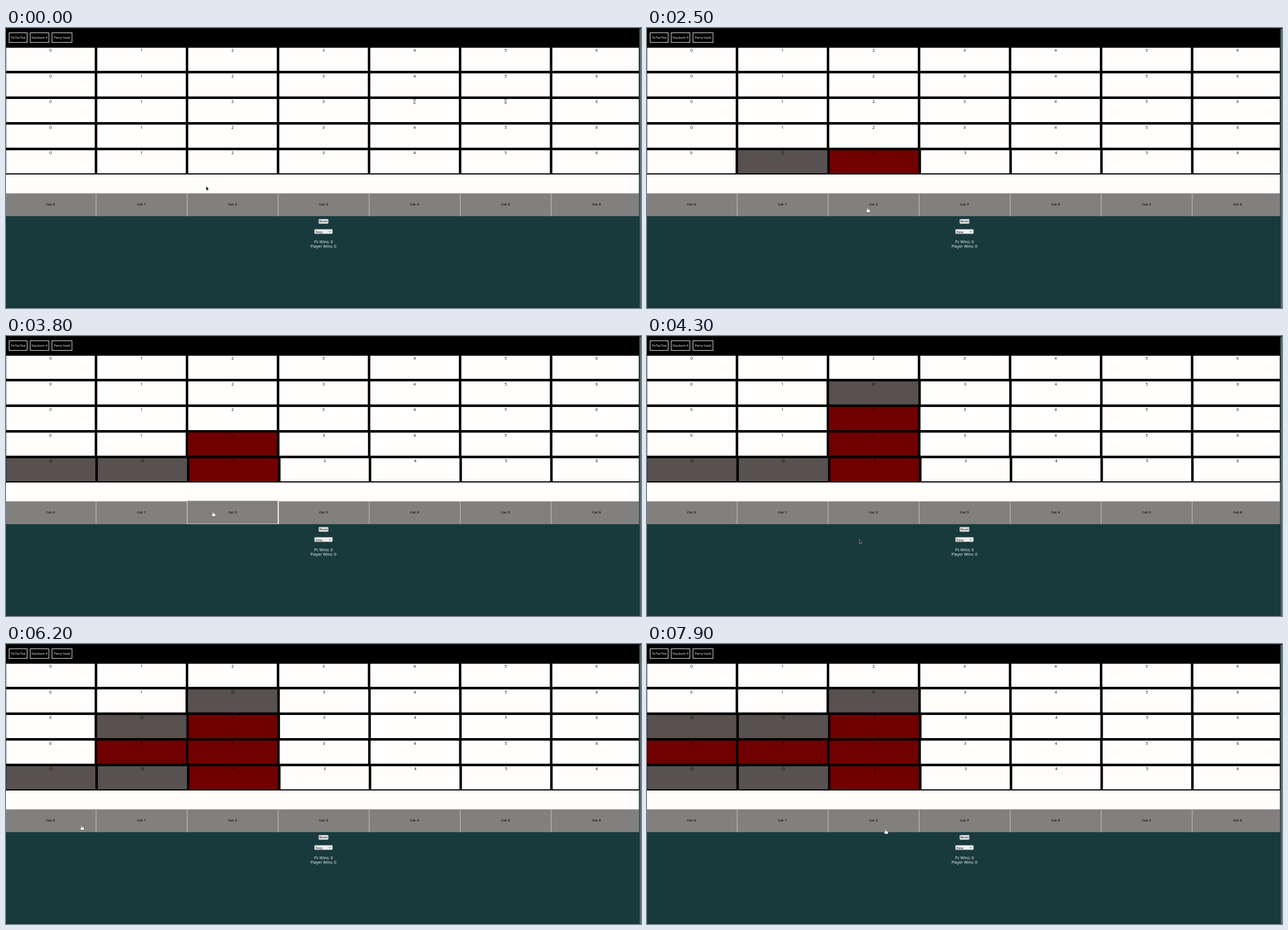
Write an HTML page with a canvas that moves like this. It is 1126 by 497 pixels and loops after 8000 ms.

```html
<!DOCTYPE html>
<html lang="en">
<head>
<meta charset="utf-8">
<title>Drop game</title>
<style>
  html, body { margin: 0; width: 100%; height: 100%; overflow: hidden; background: #183a3d; }
  canvas { display: block; }
</style>
</head>
<body>
<canvas id="stage" width="1126" height="497"></canvas>
<script>
const ctx = document.getElementById('stage').getContext('2d');
const LOOP = 8000, TICK = 100, COLS = 7, ROWS = 5;
const PITCH = 161.4, CELL = 157, RIGHT = 1122.5;
const WHITE = '#fffefd', GREY = '#82807e', TEAL = '#183a3d';
const FILL = { X: '#700000', O: '#575150' };
const EXTRA = { X: 0.6, O: 1.6 }; // a letter is wider than a digit and pushes its row

// time, player column, computer column, how long the button was held
const TURNS = [[1500, 2, 1, 100], [2700, 2, 0, 0], [3900, 2, 2, 100], [5500, 1, 1, 500], [6300, 0, 0, 0]];

// first and last step, end point, optional control point of the curve
const STROKES = [
  [100, 300, 375, 244],
  [1100, 1400, 383, 308],
  [1900, 1900, 410, 320],
  [2100, 2500, 391, 319, 455, 362],
  [2900, 3600, 367, 312, 345, 388],
  [4100, 4300, 376.5, 361],
  [4600, 4800, 287, 307],
  [5400, 5500, 288, 336.5],
  [5700, 5800, 180, 337],
  [6000, 6200, 134, 322],
  [6600, 6600, 150, 327],
  [6800, 7600, 423, 329, 286, 372],
];

function rect(x, y, w, h, color) {
  ctx.fillStyle = color;
  ctx.fillRect(x, y, w, h);
}

function frame(x, y, w, h, color) {
  ctx.strokeStyle = color;
  ctx.lineWidth = 1;
  ctx.strokeRect(x, y, w, h);
}

function text(str, x, baseline, size, color, align = 'center', weight = 400) {
  ctx.font = `${weight} ${size}px "Open Sans", "Noto Sans", sans-serif`;
  ctx.textAlign = align;
  ctx.fillStyle = color;
  ctx.fillText(str, x, baseline);
}

function drawNav() {
  rect(0, 0, 1126, 260, '#000');
  rect(0, 0, 1126, 1, '#1c1c1c');
  let x = 5.5;
  for (const [label, w] of [['TicTacToe', 32], ['Stackum 4', 33], ['Perry Vask', 35.5]]) {
    frame(x, 8.5, w, 17, '#e8e8e8');
    text(label, x + w / 2, 19, 5.87, '#fff');
    x += w + 5.5;
  }
}

// Each mark falls onto the pile in its column.
function boardAt(t) {
  const board = Array.from({ length: ROWS }, () => []);
  const height = Array(COLS).fill(0);
  const drop = (col, mark) => { board[ROWS - ++height[col]][col] = mark; };
  for (const [time, player, computer] of TURNS) {
    if (t < time) break;
    drop(player, 'X');
    drop(computer, 'O');
  }
  return board;
}

function drawRow(marks, row, t) {
  const extra = c => EXTRA[marks[c]] || 0;
  const total = marks.reduce((sum, mark) => sum + EXTRA[mark], 0);
  const y = 35 + 45.5 * row;
  let x = 0.4;
  for (let c = 0; c < COLS; c++) {
    const w = CELL + extra(c) - total / COLS, mid = x + w / 2;
    rect(x, y, Math.min(w, 1122 - x), 41, FILL[marks[c]] || WHITE);
    const selected = t < 700 && row === 2 && (c === 4 || c === 5);
    if (selected) rect(mid - 2, y, 4, 9, '#a5a5a5');
    text(marks[c] || c, mid, y + 7, 7.04, selected ? '#eee' : '#000');
    x += w + PITCH - CELL;
  }
}

function drawButtons(t) {
  rect(0, 260, RIGHT, 74, WHITE);
  rect(0, 293.5, RIGHT, 40.5, GREY);
  const turn = TURNS.find(([time, , , hold]) => t >= time - hold && t < time);
  for (let c = 0; c < COLS; c++) {
    const x = PITCH * c;
    rect(x + 159.3, 293.5, 1, 40.5, '#cac8c6');
    if (turn && turn[1] === c) {
      rect(x - 1, 292, 161, 42, GREY);
      frame(x - 1.5, 292.5, 161, 41, '#c9c7c5');
      rect(x + 159, 292, 2, 42, '#f2f0ee');
    }
    text('Col: ' + c, x + 78.8, 315.4, 5.87, '#000', 'center', 600);
  }
}

function drawControl(x, y, w) {
  ctx.beginPath();
  ctx.roundRect(x, y, w, 8, 1.3);
  ctx.fillStyle = '#efefef';
  ctx.fill();
  ctx.lineWidth = 0.6;
  ctx.strokeStyle = '#8c9293';
  ctx.stroke();
}

function drawPanel() {
  rect(0, 334, 1126, 163, TEAL);
  drawControl(554.5, 339.2, 17);
  drawControl(547, 357.2, 32);
  text('Reset', 563, 345.4, 5.87, '#000');
  text('Easy', 549, 363.5, 5.87, '#000', 'left');
  ctx.lineWidth = 0.8;
  ctx.strokeStyle = '#222';
  ctx.stroke(new Path2D('M572.7 360.7l1.6 1.6 1.6-1.6'));
  text('Pc Wins: 0', 563, 381.8, 7.04, '#fff');
  text('Player Wins: 0', 563, 390.4, 7.04, '#fff');
}

function drawScrollbar() {
  rect(RIGHT, 1, 3.5, 496, '#20383b');
  rect(1124, 2, 1.5, 495, '#6d7f81');
}

function pointerAt(t) {
  const now = Math.floor(t / TICK) * TICK;
  let x = 355, y = 281;
  for (const [first, last, endX, endY, midX = (x + endX) / 2, midY = (y + endY) / 2] of STROKES) {
    if (now < first) break;
    const u = Math.min(1, (now - first + TICK) / (last - first + TICK));
    const bend = (a, b, c) => (1 - u) ** 2 * a + 2 * u * (1 - u) * b + u * u * c;
    x = bend(x, midX, endX);
    y = bend(y, midY, endY);
  }
  return [x, y];
}

const ARROW = new Path2D('M0 0V6.8L1.5 5.5 2.6 8 3.6 7.6 2.6 5.1H4.6Z');
const HAND = new Path2D('M-.7.6Q0-.3.7.6V3L4 3.8Q4.6 4 4.5 5L4 8H-.6L-2.8 5.2Q-2.8 4.2-1.8 4.5L-.7 5.4Z');

function drawPointer(t) {
  const [x, y] = pointerAt(t);
  const hand = y > 293 && y < 334;
  const shape = hand ? HAND : ARROW;
  ctx.save();
  ctx.translate(x, y);
  ctx.lineWidth = 0.9;
  ctx.lineJoin = 'round';
  ctx.strokeStyle = hand ? '#222' : '#fff';
  ctx.fillStyle = hand ? '#fff' : '#111';
  ctx.stroke(shape);
  ctx.fill(shape);
  ctx.restore();
}

function draw() {
  const t = performance.now() % LOOP;
  drawNav();
  boardAt(t).forEach((marks, row) => drawRow(marks, row, t));
  drawButtons(t);
  drawPanel();
  drawScrollbar();
  drawPointer(t);
  requestAnimationFrame(draw);
}
draw();
</script>
</body>
</html>
```
